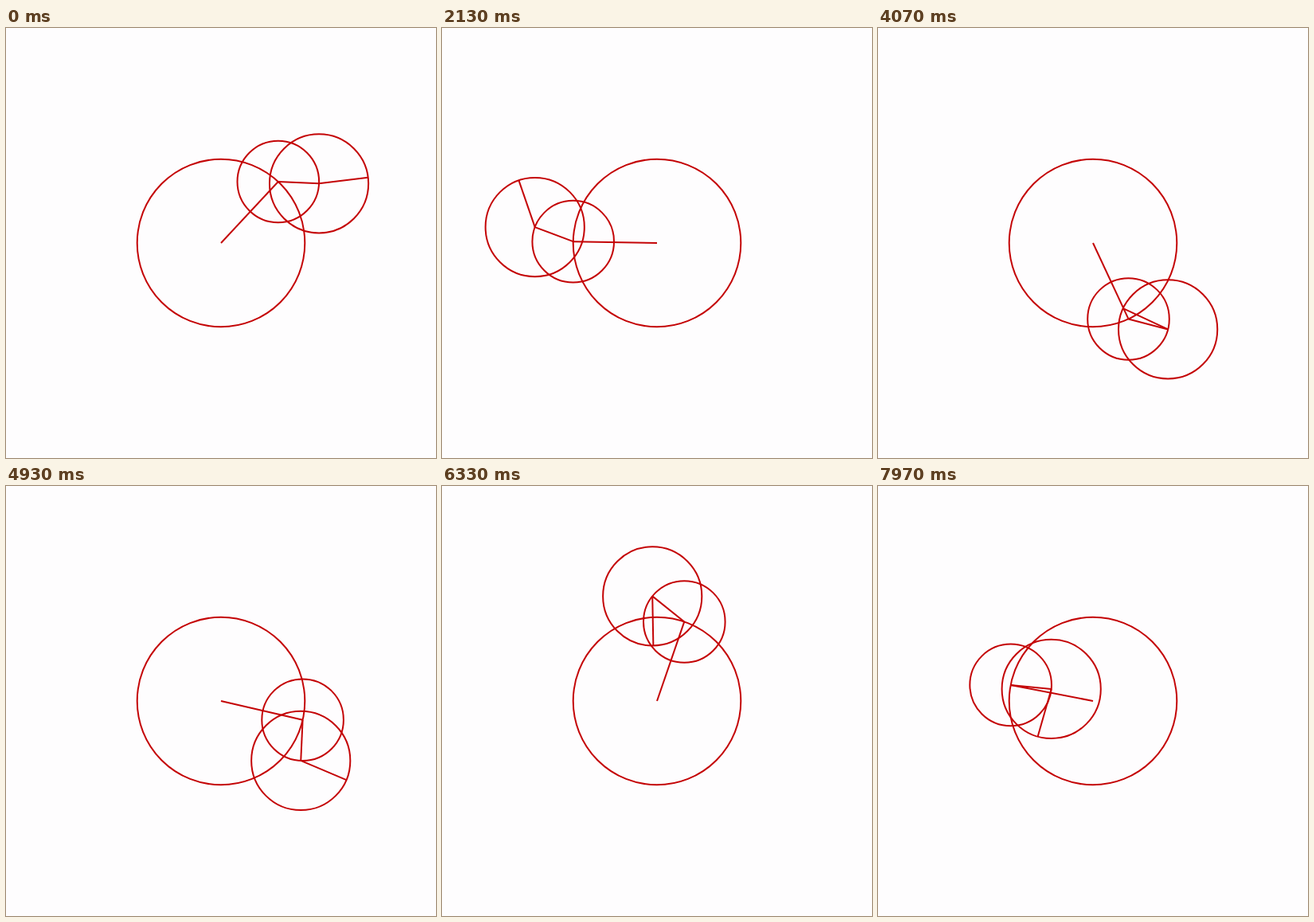
Animation, 540 px wide and 540 px high, one loop 8000 ms. Source, as an HTML page:

```html
<!DOCTYPE html>
<html lang="en">
<head>
<meta charset="utf-8">
<title>Rotating arms</title>
<style>
  html, body { margin: 0; width: 100%; height: 100%; overflow: hidden; background: #fefdfe; }
  svg { display: block; width: 100%; height: 100%; }
</style>
</head>
<body>
<svg viewBox="0 0 540 540" fill="none" stroke="#c40406" stroke-width="2"></svg>
<script>
  const LOOP = 8000, FPS = 30, CENTER = 270;
  const svg = document.querySelector('svg');

  // Radius, start angle and speed in degrees, counterclockwise.
  const arms = [
    { r: 105.3, start: 47, speed: 60 },
    { r: 51.3, start: -2.65, speed: -90 },
    { r: 62.1, start: 7.05, speed: 210 }
  ];

  function add(tag) {
    return svg.appendChild(document.createElementNS('http://www.w3.org/2000/svg', tag));
  }

  function set(el, attrs) {
    for (const key in attrs) el.setAttribute(key, attrs[key]);
  }

  for (const arm of arms) {
    arm.circle = add('circle');
    arm.line = add('line');
    set(arm.circle, { r: arm.r });
  }

  function draw(ms) {
    const step = Math.floor((Math.floor(ms / 10) * 10 + 5) * FPS / 1000);
    // The motion skips two steps right after the opening pose.
    const time = (step ? step + 2 : 0) / FPS;
    let x = CENTER, y = CENTER;
    for (const arm of arms) {
      const angle = (arm.start + arm.speed * time) * Math.PI / 180;
      const x2 = x + arm.r * Math.cos(angle);
      const y2 = y - arm.r * Math.sin(angle);
      set(arm.circle, { cx: x, cy: y });
      set(arm.line, { x1: x, y1: y, x2, y2 });
      x = x2;
      y = y2;
    }
  }

  const begin = performance.now();

  function tick() {
    draw((performance.now() - begin) % LOOP);
    requestAnimationFrame(tick);
  }

  tick();
</script>
</body>
</html>
```
